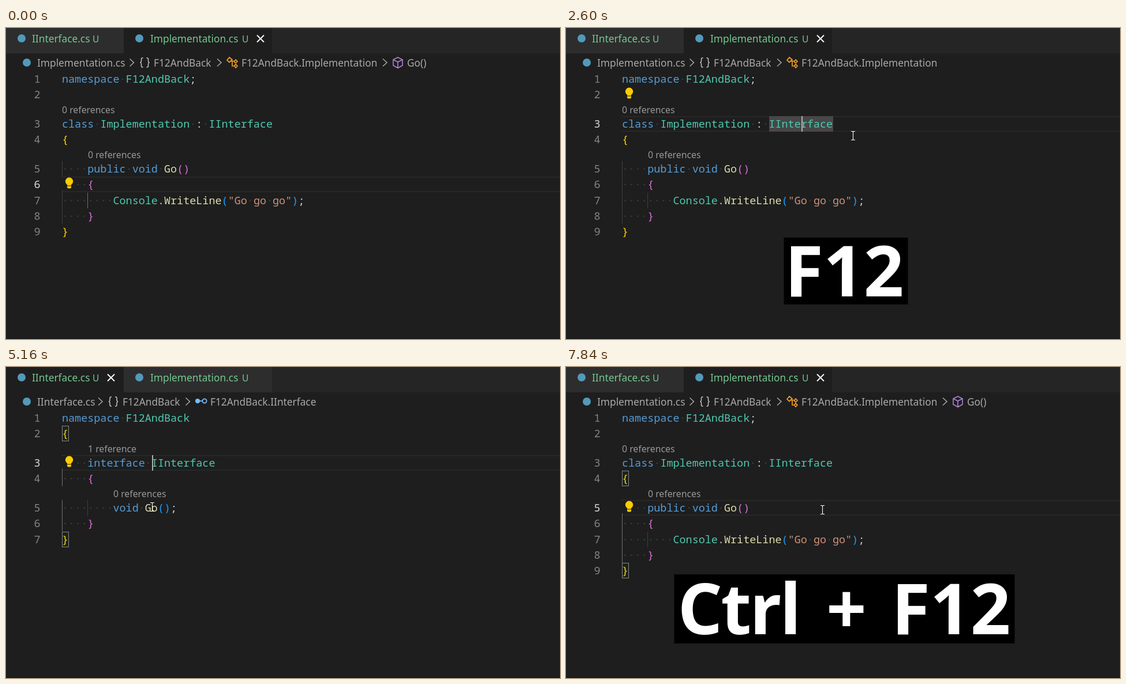
Recreate the animation shown at these times as an HTML page. Size 960 by 540 pixels, loop 8000 ms.

```html
<!DOCTYPE html>
<html lang="en">
<head>
<meta charset="utf-8">
<title>Go to definition and implementation</title>
<style>
html, body { margin: 0; width: 100%; height: 100%; overflow: hidden; background: #1e1e1e; }
svg { display: block; }
text { font-family: "Noto Sans", "Open Sans", sans-serif; font-size: 17.3px; fill: #a9a9a9; }
.code { font-family: "Noto Sans Mono", "DejaVu Sans Mono", monospace; font-size: 18.45px; font-variant-ligatures: none; }
.num { fill: #858585; }
.now { fill: #c6c6c6; }
.lens { font-size: 15.8px; fill: #999; }
.tab { fill: #73c991; }
.small { font-size: 15.5px; }
.big { font-size: 122px; font-weight: 700; fill: #fff; }
.line { fill: none; stroke: #a9a9a9; stroke-width: 1.5; }
</style>
</head>
<body>
<svg id="stage" width="960" height="540" viewBox="0 0 960 540"></svg>
<script>
const LOOP = 8000;
const LEFT = 97, CHAR = 11.07;
const ROWS = [75, 102, 153, 180, 231, 258, 286, 313, 340];
const rules = [];
const pct = ms => (ms / LOOP * 100).toFixed(4) + '%';
const col = n => LEFT + n * CHAR;
const rowY = row => ROWS[row - 1];

// Timing helpers: hard-stepped CSS keyframes
function animate(name, steps) {
  rules.push(`@keyframes ${name}{${steps.map(([t, css]) => `${pct(t)}{${css}}`).join('')}}`,
    `.${name}{animation:${name} ${LOOP}ms step-end infinite}`);
}

// times: alternating show and hide moments
function on(times, content) {
  const name = 'on' + rules.length;
  const steps = times.map((t, i) => [t, `opacity:${1 - i % 2}`]).filter(([t]) => t < LOOP);
  if (times[0] > 0) steps.unshift([0, 'opacity:0']);
  animate(name, steps);
  return `<g class="${name}">${content}</g>`;
}

// Shapes
const rect = (x, y, w, h, fill) => `<rect x="${x}" y="${y}" width="${w}" height="${h}" fill="${fill}"/>`;
const text = (x, y, str, cls = '') => `<text x="${x}" y="${y}" class="${cls}">${str}</text>`;
const path = (x, y, d, color = '#a9a9a9', width = 1.5) =>
  `<path class="line" transform="translate(${x} ${y})" d="${d}" style="stroke:${color};stroke-width:${width}"/>`;
const dot = (x, y) => `<circle cx="${x}" cy="${y}" r="7" fill="#519aba"/>`;
const chevron = x => path(x, 60, 'M-3.5-6.5 3.5 0-3.5 6.5');
const cross = x => path(x, 18.5, 'M-6-6 6 6M6-6-6 6', '#fff', 1.9);
const braces = x => path(x, 60,
  'M-3-8h-1q-2 0-2 2v3.5q0 2-2 2.5 2 .5 2 2.5v3.5q0 2 2 2h1M3-8h1q2 0 2 2v3.5q0 2 2 2.5-2 .5-2 2.5v3.5q0 2-2 2h-1', '#c5c5c5');
const cube = x => path(x, 60, 'M0-9 8-5V5L0 9.5-8 5V-5ZM-8-5 0-1 8-5M0-1V9', '#b180d7', 1.6);
const classIcon = x => path(x, 60,
  'M-5-9-9-4-5-.5 0-5ZM-2-2.5H4M0-2.5V6H4M6-5 9-2 6 1 3.5-1.5ZM6 3 9 6 6 9 3.5 6Z', '#ee9d28', 1.7);
const linkIcon = x => path(x, 60, 'M-4-1H3', '#75beff', 1.8) +
  `<circle cx="${x - 6}" cy="59" r="4" fill="#75beff"/>` +
  `<circle cx="${x + 6}" cy="59" r="3.6" class="line" style="stroke:#75beff;stroke-width:1.8"/>`;

const guide = (x, y, h, lit) => rect(x, y, 1, h, lit ? '#707070' : '#404040');
const caret = (x, row) => rect(x, rowY(row), 2, 27, '#aeafad');
const mark = (from, len, row, fill) => rect(Math.round(col(from)), rowY(row), Math.round(len * CHAR), 27, fill);
const pairBox = (n, row) =>
  `<rect x="${Math.round(col(n)) + .5}" y="${rowY(row) + .5}" width="11" height="26" fill="#006400" fill-opacity=".1" stroke="#888"/>`;
const activeRow = row => rect(LEFT, rowY(row), 863, 1.5, '#2a2a2a') + rect(LEFT, rowY(row) + 25.5, 863, 1.5, '#2a2a2a');
const activeNum = row => text(48.5, rowY(row) + 20, row, 'code now');
const bulb = row => {
  const y = rowY(row);
  return rect(LEFT, y + 1, 22, 22, '#1e1e1e') +
    `<path fill="#ffcc00" d="M106 ${y + 14}a6.7 6.7 0 1 1 7 0v1.5h-7zM106 ${y + 16.5}h7v2q0 2-2 2h-3q-2 0-2-2z"/>`;
};

// Small syntax highlighter
const KEYWORDS = 'namespace class interface public void'.split(' ');
const TYPES = 'F12AndBack Implementation IInterface Console'.split(' ');
const METHODS = ['Go', 'WriteLine'];
const PAIRS = ['#ffd700', '#da70d6', '#179fff'];

function highlight(lines) {
  let depth = 0, quoted = false;
  const color = token => {
    if (token === ' ') return '#414141';
    if (token === '"') quoted = !quoted;
    if (quoted || token === '"') return '#ce9178';
    if (KEYWORDS.includes(token)) return '#569cd6';
    if (TYPES.includes(token)) return '#4ec9b0';
    if (METHODS.includes(token)) return '#dcdcaa';
    if ('{('.includes(token)) return PAIRS[depth++];
    if ('})'.includes(token)) return PAIRS[--depth];
    return '#d4d4d4';
  };
  return lines.map((line, i) => {
    const spans = (line.match(/\w+|./g) || []).map(token =>
      `<tspan fill="${color(token)}">${token === ' ' ? '·' : token}</tspan>`);
    return text(LEFT, ROWS[i] + 20, spans.join(''), 'code');
  }).join('');
}

const numbers = (from, to) => ROWS.slice(from - 1, to)
  .map((y, i) => text(48.5, y + 20, from + i, 'code num')).join('');

const implementation = [
  'namespace F12AndBack;', '', 'class Implementation : IInterface', '{',
  '    public void Go()', '    {', '        Console.WriteLine("Go go go");', '    }', '}'];
const contract = [
  'namespace F12AndBack', '{', '    interface IInterface', '    {',
  '        void Go();', '    }', '}'];

const tabs = dot(27, 18) + text(45, 25, 'IInterface.cs', 'tab') + text(150, 24.5, 'U', 'tab small') +
  dot(231, 18) + text(250, 25, 'Implementation.cs', 'tab') + text(409, 24.5, 'U', 'tab small');

const implDoc =
  rect(0, 0, 204, 44, '#2d2d2d') + rect(204, 0, 257, 44, '#1e1e1e') + cross(441) +
  text(54, 67, 'Implementation.cs') + chevron(218) + braces(240.5) + text(256, 67, 'F12AndBack') +
  chevron(369.5) + classIcon(392) + text(408, 67, 'F12AndBack.Implementation') +
  on([0, 1480, 7370, LOOP], chevron(656.5) + cube(679) + text(695, 67, 'Go()')) +
  numbers(8, 9) + guide(97, 231, 109) + guide(141, 286, 27) +
  on([0, 1320], guide(141, 286, 27, true)) +
  on([7370, LOOP], guide(97, 231, 109, true)) +
  on([1560, 3000], mark(23, 10, 3, '#474747')) +
  on([7370, 7640], mark(16, 2, 5, '#613214')) +
  on([7370, LOOP], pairBox(0, 4) + pairBox(0, 9)) +
  text(97, 148, '0 references', 'lens') + text(142, 226, '0 references', 'lens') +
  highlight(implementation) +
  on([0, 1320], bulb(6)) + on([1640, 3000], bulb(2)) + on([7700, LOOP], bulb(5)) +
  on([1320, 1940, 2480, 3000], caret(408, 3)) + on([7370, 7840], caret(274, 5));

const contractDoc =
  rect(0, 0, 204, 44, '#1e1e1e') + rect(204, 0, 257, 44, '#2d2d2d') + cross(182) +
  text(54, 67, 'IInterface.cs') + chevron(163.5) + braces(186) + text(202, 67, 'F12AndBack') +
  chevron(315) + linkIcon(338) + text(354, 67, 'F12AndBack.IInterface') +
  on([5500, 7370], chevron(548) + cube(570.5) + text(586, 67, 'Go()')) +
  guide(97, 153, 54) + guide(97, 231, 54) + guide(141, 231, 27) +
  on([3000, 5360], guide(97, 153, 54, true) + guide(97, 231, 54, true)) +
  on([5360, 7370], guide(141, 231, 27, true)) +
  on([3000, 3400], mark(14, 10, 3, '#613214')) +
  on([5500, 7370], mark(13, 2, 5, '#474747')) +
  on([3200, 5360], pairBox(0, 2) + pairBox(0, 7)) +
  on([5430, 7370], pairBox(4, 4) + pairBox(4, 6)) +
  text(142, 148, '1 reference', 'lens') + text(186, 226, '0 references', 'lens') +
  highlight(contract) +
  on([3460, 5360], bulb(3)) +
  on([3000, 3610, 4140, 4650, 5160, 5360], caret(253, 3)) +
  on([5360, 5910, 6370, 6910], caret(253, 5));

const badges =
  on([2600, 4010], rect(377.5, 364, 215, 116, '#000') + text(379, 466, 'F12', 'big')) +
  on([6780, LOOP], rect(187.5, 360, 590, 120, '#000') +
    `<g letter-spacing="-3">${text(193.5, 464, 'Ctrl', 'big')}</g>` +
    text(451, 464, '+', 'big') + text(564, 464, 'F12', 'big'));

// Pointer trips: start, end, steps, from x, y, to x, y
const trips = [
  [70, 180, 3, 798, 476, 513, 256],
  [580, 1120, 9, 511, 254, 415, 160],
  [1400, 1800, 6, 419, 161, 497, 187],
  [4220, 4750, 8, 492, 189, 285, 230],
  [4820, 5160, 5, 281, 232, 253, 243],
  [5430, 5710, 5, 262, 243, 444, 248]
];
const ease = k => k * k * (3 - 2 * k);
animate('pointer', trips.flatMap(([t0, t1, n, x0, y0, x1, y1]) =>
  Array.from({ length: n }, (_, i) => {
    const k = i / (n - 1), e = ease(k);
    const x = Math.round(x0 + (x1 - x0) * e), y = Math.round(y0 + (y1 - y0) * e);
    return [t0 + (t1 - t0) * k, `transform:translate(${x}px,${y}px)`];
  })));
const pointer = on([70, LOOP], '<g class="pointer">' +
  path(.5, 0, 'M-3.5-7.5h2.5l1 1 1-1h2.5M0-6.5V6.5M-3.5 7.5h2.5l1-1 1 1h2.5', '#fff', 1.1) + '</g>');

document.getElementById('stage').innerHTML =
  rect(0, 0, 960, 540, '#1e1e1e') + rect(0, 0, 960, 44, '#252526') + rect(0, 538, 960, 2, '#1a1a1a') +
  on([0, 1320], activeRow(6)) + on([1320, 5360], activeRow(3)) + on([5360, LOOP], activeRow(5)) +
  dot(36, 60) + numbers(1, 7) +
  on([0, 1320], activeNum(6)) + on([1320, 5360], activeNum(3)) + on([5360, LOOP], activeNum(5)) +
  on([0, 3000, 7370, LOOP], implDoc) + on([3000, 7370], contractDoc) +
  tabs + badges + pointer;

const style = document.createElement('style');
style.textContent = rules.join('\n');
document.head.append(style);
</script>
</body>
</html>
```
